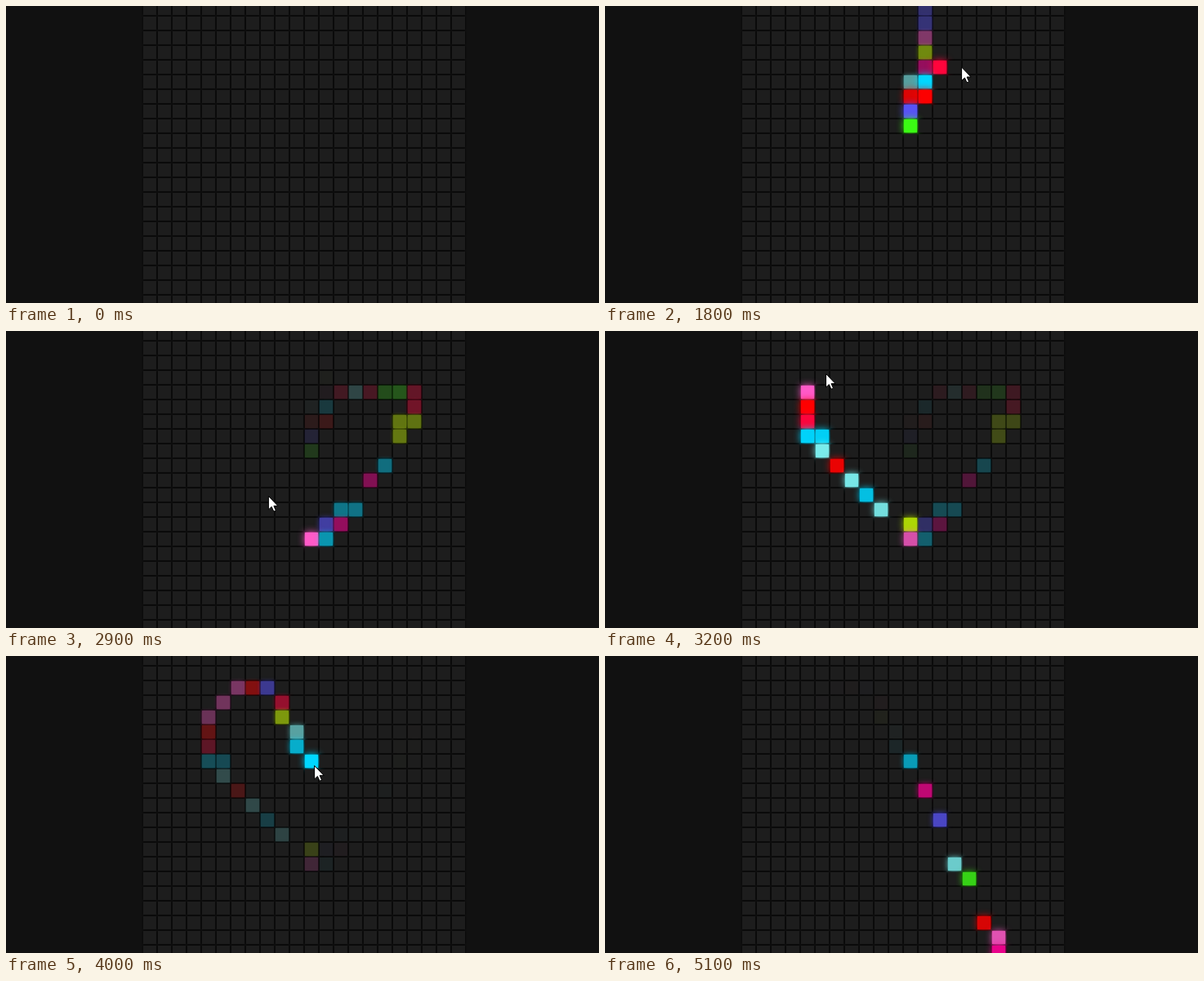
Animation, 726 px wide and 364 px high, one loop 5200 ms. Source, as an HTML page with a canvas:

```html
<!DOCTYPE html>
<html lang="en">
<head>
<meta charset="utf-8">
<title>Hover board</title>
<style>
  html, body { margin: 0; width: 100%; height: 100%; overflow: hidden; background: #111; }
  canvas { display: block; }
</style>
</head>
<body>
<canvas id="stage" width="726" height="364"></canvas>
<script>
const LOOP = 5200, STEP = 100, FADE = 2000, LEAD = 40;
const COLS = 22, ROWS = 21, PITCH = 18, SIZE = 16, LEFT = 168, TOP = -5;
const BASE = [29, 29, 29], BLACK = [0, 0, 0];
const PALETTE = {
  v: [90, 85, 255], p: [255, 90, 200], l: [200, 250, 0],
  m: [255, 0, 150], c: [0, 215, 255], i: [130, 255, 255],
  r: [255, 0, 0], x: [255, 5, 60], g: [60, 255, 20]
};

// Pointer waypoints: time, column, row, colours of the cells lit on the way to the next one.
const path = [
  [1000, 12, 0, 'vvpl'], [1200, 12, 4, 'm'], [1245, 11, 5, 'i'],
  [1285, 11, 5.6, 'r'], [1480, 11, 5.6, 'r'], [1530, 11, 7, 'v'], [1690, 11, 8, 'g'],
  [1720, 12, 6, 'rc'], [1790, 12.9, 4, 'xixg'], [1920, 17, 4, 'g'], [2000, 18, 4, 'x'],
  [2090, 18, 5, 'x'], [2170, 18, 6, 'l'], [2187, 17, 6, 'l'], [2204, 17, 7, 'l'],
  [2221, 16, 9, 'cm'], [2258, 14, 11.9, 'c'], [2272, 13, 12, 'c'], [2288, 13, 13, 'm'],
  [2340, 11.8, 13.4, 'v'], [2395, 11.8, 13.9, 'c'], [2450, 11, 13.6, 'p'],
  [2850, 11, 13.6, 'p'], [2905, 11, 13, 'l'], [2922, 9, 12, 'icir'], [3000, 5, 8, 'i'],
  [3015, 5, 7, 'c'], [3075, 4, 7, 'c'], [3110, 4, 6, 'xr'], [3190, 4, 4, 'pp'],
  [3270, 6, 2, 'pr'], [3360, 8, 2, 'v'], [3420, 9, 3, 'x'], [3445, 9, 4, 'l'],
  [3470, 10, 5, 'i'], [3495, 10, 6, 'c'], [3660, 11.2, 7.3, 'c'], [4630, 11.2, 7.3, 'c'],
  [4680, 12, 9, 'mv'], [4730, 14, 13.9, 'i'], [4760, 15, 15, 'g'], [4785, 16, 18, 'r'],
  [4810, 17, 19, 'pm'], [4890, 17, 21, '']
];

const mix = (a, b, k) => a + (b - a) * k;
const mixList = (a, b, k) => a.map((v, i) => mix(v, b[i], k));
const css = (c, alpha = 1) => `rgba(${c.map(Math.round).join()},${alpha})`;
const bezier = (s, a, b) => 3 * a * s * (1 - s) ** 2 + 3 * b * s * s * (1 - s) + s ** 3;

// CSS "ease"
function ease(x) {
  let lo = 0, hi = 1;
  for (let i = 0; i < 20; i++) {
    const mid = (lo + hi) / 2;
    if (bezier(mid, 0.25, 0.25) < x) lo = mid; else hi = mid;
  }
  return bezier(lo, 0.1, 1);
}

// Walk the path cell by cell and note when each cell is entered and left.
const visits = [];
path.slice(0, -1).forEach((from, n) => {
  const letters = [...from[3]], a = from.slice(0, 3), b = path[n + 1].slice(0, 3);
  letters.forEach((letter, i) => {
    const [enter, col, row] = mixList(a, b, i / letters.length);
    const leave = mix(a[0], b[0], (i + 1) / letters.length);
    visits.push({ cell: Math.round(row) * COLS + Math.round(col), enter, leave, color: PALETTE[letter] });
  });
});

function box(c, x, y, fill, shadow, blur) {
  c.fillStyle = fill;
  c.shadowColor = shadow;
  c.shadowBlur = blur;
  c.fillRect(x, y, SIZE, SIZE);
}

const idleCell = document.createElement('canvas');
idleCell.width = idleCell.height = SIZE + 8;
box(idleCell.getContext('2d'), 4, 4, css(BASE), '#000', 2);

const ctx = document.getElementById('stage').getContext('2d');

function drawCell(col, row, t, visit) {
  const x = LEFT + col * PITCH, y = TOP + row * PITCH;
  const age = visit ? Math.max(0, t - visit.leave) / FADE : 1;
  if (age >= 1) {
    ctx.drawImage(idleCell, x - 4, y - 4);
    return;
  }
  const k = ease(age);
  const fill = css(mixList(visit.color, BASE, k));
  box(ctx, x, y, fill, css(visit.color, 1 - k), 10 * (1 - k));
  box(ctx, x, y, fill, css(mixList(visit.color, BLACK, k)), 2);
  ctx.shadowColor = 'transparent';
}

const arrow = new Path2D('M0 0V16.5L3.8 13L6.4 18.8L9 17.7L6.5 12H11.5Z');

// The pointer runs slightly ahead of the cells it lights.
function drawPointer(t) {
  const next = path.findIndex(p => p[0] > t + LEAD);
  if (next < 1) return;
  const a = path[next - 1].slice(0, 3), b = path[next].slice(0, 3);
  const [, col, row] = mixList(a, b, (t + LEAD - a[0]) / (b[0] - a[0]));
  ctx.save();
  ctx.translate(LEFT + col * PITCH + SIZE / 2, TOP + row * PITCH + SIZE / 2);
  ctx.fillStyle = '#fff';
  ctx.strokeStyle = '#000';
  ctx.lineWidth = 1;
  ctx.fill(arrow);
  ctx.stroke(arrow);
  ctx.restore();
}

function draw(now) {
  const t = Math.floor((now % LOOP) / STEP) * STEP;
  const latest = new Map(visits.filter(v => v.enter <= t).map(v => [v.cell, v]));
  ctx.fillStyle = '#111';
  ctx.fillRect(0, 0, 726, 364);
  for (let row = 0; row < ROWS; row++) {
    for (let col = 0; col < COLS; col++) drawCell(col, row, t, latest.get(row * COLS + col));
  }
  drawPointer(t);
}

let start;
function tick(now) {
  start ??= now;
  draw(now - start);
  requestAnimationFrame(tick);
}
draw(0);
requestAnimationFrame(tick);
</script>
</body>
</html>
```
